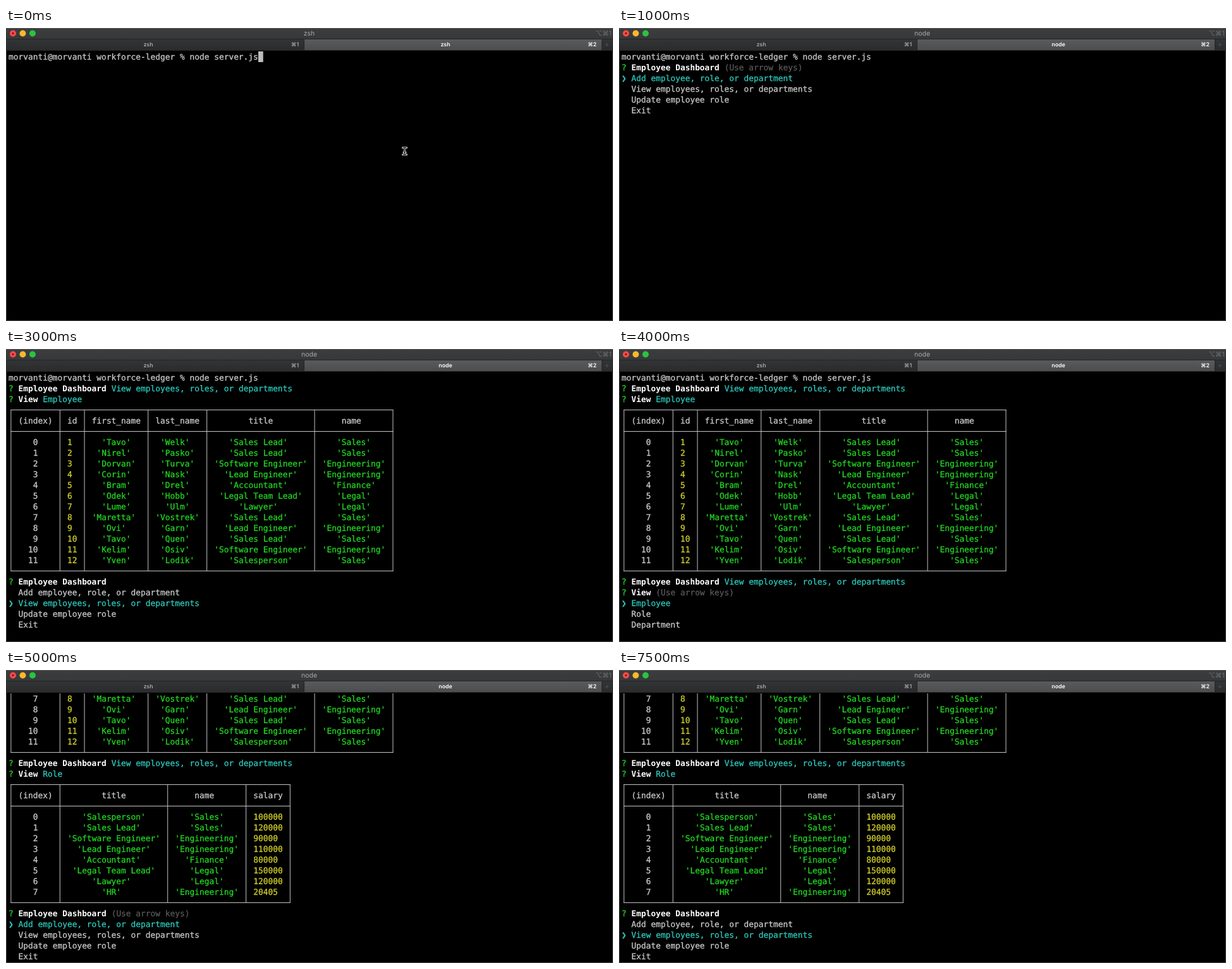
Recreate the animation shown at these times as an HTML page. Size 960 by 464 pixels, loop 8000 ms.

```html
<!DOCTYPE html>
<html lang="en">
<head>
<meta charset="utf-8">
<title>Terminal session</title>
<style>
  html, body { margin: 0; width: 100%; height: 100%; overflow: hidden; background: #000; }
  svg { display: block; width: 100vw; height: 100vh; }
  text { text-rendering: geometricPrecision; }
  #screen { color: #c9c9c9; }
  #screen text { font: 12.864px "DejaVu Sans Mono", "DejaVu Sans", monospace; fill: currentColor; stroke: currentColor; stroke-width: .3px; }
  #screen .green { color: #22d622; }
  #screen .yellow { color: #d0cd2a; }
  #screen .cyan { color: #2cc9bc; }
  #screen .dim { color: #585858; }
  #screen .bold { color: #fff; font-weight: bold; stroke: none; }
  #screen path { fill: none; stroke: #c4c4c4; }
  #chrome text { font: 10.5px Inter, "DejaVu Sans", sans-serif; fill: #a9a9a9; text-anchor: middle; }
  #chrome .tab { font-size: 8.8px; font-weight: 600; }
  #chrome .on { fill: #fff; }
  #chrome .faint { fill: #707173; }
</style>
</head>
<body>
<svg viewBox="0 0 960 464">
  <defs>
    <linearGradient id="bar" x2="0" y2="1"><stop stop-color="#3c3d3f"/><stop offset="1" stop-color="#37383a"/></linearGradient>
    <linearGradient id="idle" x2="0" y2="1"><stop stop-color="#333436"/><stop offset="1" stop-color="#2a2b2d"/></linearGradient>
    <linearGradient id="live" x2="0" y2="1"><stop stop-color="#5a5b5d"/><stop offset="1" stop-color="#4c4d4f"/></linearGradient>
  </defs>
  <rect width="960" height="464"/>
  <g id="screen"></g>
  <g id="chrome">
    <rect width="960" height="37"/>
    <rect width="960" height="18" fill="url(#bar)"/>
    <rect y="18" width="960" height="17" fill="url(#idle)"/>
    <rect x="471" y="18" width="471" height="17" fill="url(#live)"/>
    <path d="M0 .5H960" stroke="#565759"/>
    <path d="M0 17.5H960M471.5 18V35M942.5 18V35M0 35.5H960" stroke="#232425"/>
    <path d="M.5 36V463.5H959.5V36" fill="none" stroke="#444"/>
    <circle cx="11" cy="8.5" r="5" fill="#fc4a48"/>
    <circle cx="11" cy="8.5" r="1.4" fill="#6d0b0a"/>
    <circle cx="26.5" cy="8.5" r="5" fill="#f7b92c"/>
    <circle cx="42" cy="8.5" r="5" fill="#28c53f"/>
    <text id="title" x="479.5" y="12"></text>
    <text class="faint" x="945" y="12">⌥⌘1</text>
    <text class="tab" x="225" y="29">zsh</text>
    <text class="tab" x="457" y="29">⌘1</text>
    <text class="tab on" id="tab" x="695" y="29"></text>
    <text class="tab on" x="927" y="29">⌘2</text>
    <path d="M947.5 26.5h6M950.5 23.5v6" stroke="#4c4d4f"/>
  </g>
</svg>
<script>
const CELL = 7.745, LINE = 17, LEFT = 4, TOP = 37;
const $ = id => document.getElementById(id);

const roles = [
  ['Salesperson', 'Sales', 100000], ['Sales Lead', 'Sales', 120000],
  ['Software Engineer', 'Engineering', 90000], ['Lead Engineer', 'Engineering', 110000],
  ['Accountant', 'Finance', 80000], ['Legal Team Lead', 'Legal', 150000],
  ['Lawyer', 'Legal', 120000], ['HR', 'Engineering', 20405]
];
const people = ('Tavo Welk 1,Nirel Pasko 1,Dorvan Turva 2,Corin Nask 3,Bram Drel 4,Odek Hobb 5,' +
  'Lume Ulm 6,Maretta Vostrek 1,Ovi Garn 3,Tavo Quen 1,Kelim Osiv 2,Yven Lodik 0').split(',');
const staff = people.map((p, i) => {
  const [first, last, role] = p.split(' ');
  return [i + 1, first, last, ...roles[role].slice(0, 2)];
});

const put = (row, col, s, cls = '') =>
  `<text x="${LEFT + col * CELL}" y="${TOP + 13 + row * LINE}" class="${cls}">${s}</text>`;

const block = (row, col) =>
  `<rect x="${LEFT + col * CELL}" y="${TOP + row * LINE}" width="${CELL}" height="${LINE}" fill="#bcbcbc"/>`;

const prompt = put(0, 0, 'morvanti@morvanti workforce-ledger % node server.js');

function ask(row, label, answer = '', cls = 'cyan') {
  return put(row, 0, '?', 'green') + put(row, 2, label, 'bold') + put(row, 3 + label.length, answer, cls);
}
const HINT = ['(Use arrow keys)', 'dim'];

const menu = (row, items, chosen) => items.map((s, i) =>
  (i === chosen ? put(row + i, 0, '❯', 'cyan') : '') + put(row + i, 2, s, i === chosen ? 'cyan' : '')).join('');

// Bordered table with centred cells, starting at the given row.
function table(row, heads, data) {
  const last = row + 3 + data.length;
  const midX = col => LEFT + (col + .5) * CELL;
  const midY = r => TOP + (r + .5) * LINE;
  let col = 0, out = '', d = '';
  const rule = () => d += `M${midX(col)} ${midY(row)}V${midY(last)}`;
  rule();
  ['(index)', ...heads].forEach((head, k) => {
    const cells = data.map((r, i) => k === 0 ? `${i}` : typeof r[k - 1] === 'number' ? `${r[k - 1]}` : `'${r[k - 1]}'`);
    const width = 2 + Math.max(head.length, ...cells.map(s => s.length));
    const centre = (r, s, cls) => out += put(r, col + 1 + Math.floor((width - s.length) / 2), s, cls);
    centre(row + 1, head);
    cells.forEach((s, i) => centre(row + 3 + i, s, k === 0 ? '' : s[0] === "'" ? 'green' : 'yellow'));
    col += width + 1;
    rule();
  });
  for (const r of [row, row + 2, last]) d += `M${midX(0)} ${midY(r)}H${midX(col)}`;
  return out + `<path d="${d}" stroke-linecap="square"/>`;
}

const MAIN = 'Employee Dashboard';
const actions = ['Add employee, role, or department', 'View employees, roles, or departments', 'Update employee role', 'Exit'];
const kinds = ['Employee', 'Role', 'Department'];

const beam = 'M627.5 189.5h6M630.5 189.5v11M627.5 200.5h6M629 197h3';
const pointer = `<path d="${beam}" style="stroke:#e4e4e4;stroke-width:2.6" stroke-linecap="square"/><path d="${beam}" style="stroke:#111"/>`;

const viewed = ask(1, MAIN, actions[1]);
const listed = prompt + viewed + ask(2, 'View', kinds[0]) +
  table(3, ['id', 'first_name', 'last_name', 'title', 'name'], staff);
const again = listed + ask(19, MAIN, actions[1]);
const full = again + ask(20, 'View', kinds[1]) + table(21, ['title', 'name', 'salary'], roles);
const scrolled = s => `<g transform="translate(0 ${-13 * LINE})">${s}</g>`;

const scenes = [
  [0, prompt + block(0, 51) + pointer],
  [500, prompt + block(1, 0)],
  [1000, prompt + ask(1, MAIN, ...HINT) + menu(2, actions, 0)],
  [2500, prompt + viewed + ask(2, 'View', ...HINT) + menu(3, kinds, 0)],
  [3000, listed + ask(19, MAIN) + menu(20, actions, 1)],
  [4000, again + ask(20, 'View', ...HINT) + menu(21, kinds, 0)],
  [4500, again + ask(20, 'View') + menu(21, kinds, 1)],
  [5000, scrolled(full + ask(33, MAIN, ...HINT) + menu(34, actions, 0))],
  [6000, scrolled(full + ask(33, MAIN) + menu(34, actions, 1))]
];

let shown;
function draw() {
  const t = performance.now() % 8000;
  const scene = scenes.filter(s => s[0] <= t).pop();
  if (scene !== shown) {
    shown = scene;
    $('screen').innerHTML = scene[1];
    $('title').textContent = $('tab').textContent = scene[0] < 1000 ? 'zsh' : 'node';
  }
  requestAnimationFrame(draw);
}
draw();
</script>
</body>
</html>
```
